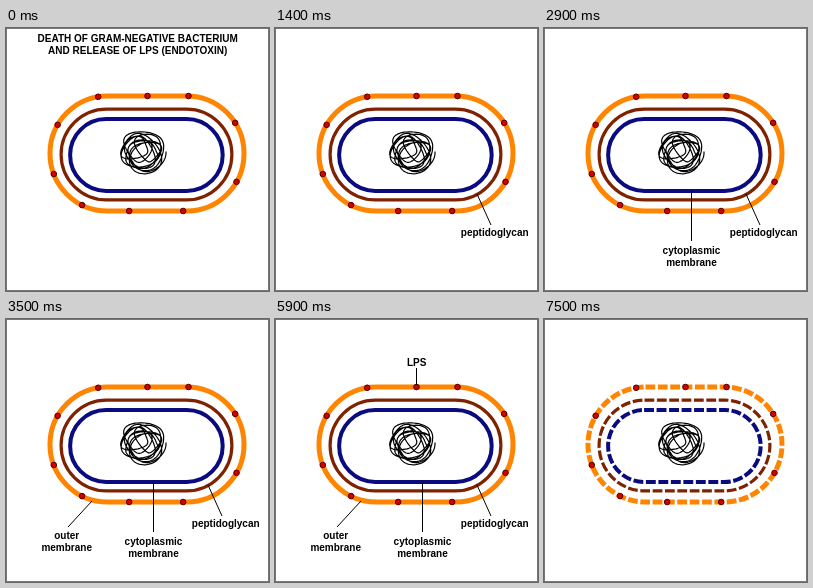
An HTML page for the animation above (8000 ms loop, 263x263 px).

```html
<!DOCTYPE html>
<html lang="en">
<head>
<meta charset="utf-8">
<title>Bacterium wall layers</title>
<style>
  html, body { margin: 0; width: 100%; height: 100%; overflow: hidden; background: #fff; }
  svg { display: block; width: 100%; height: 100%; }
  text { font: bold 10px "Liberation Sans", Arial, sans-serif; text-anchor: middle; fill: #000; }
  .frame { fill: #fff; stroke: #777; }
  .pointer { stroke: #000; stroke-width: 1; }
  .wall { fill: none; }
  .strand { fill: none; stroke: #000; stroke-width: 1.2; stroke-linejoin: round; }
  .lps { fill: #d40000; stroke: #500000; stroke-width: 1; }
</style>
</head>
<body>
<svg id="stage" viewBox="0 0 263 263"></svg>
<script>
const LOOP = 8000;
const FIRST_LABEL = 500, LABEL_GAP = 1500, LABELS_END = 6500, BREAKUP = 7500;
const LINE_HEIGHT = 12;
const DASH = 12.5, DASH_GAP = 2.6;
const stage = document.getElementById('stage');

function add(parent, tag, attrs = {}, text = '') {
  const el = document.createElementNS('http://www.w3.org/2000/svg', tag);
  for (const key in attrs) el.setAttribute(key, attrs[key]);
  if (text) el.textContent = text;
  parent.appendChild(el);
  return el;
}

// A group that is visible only from start to end (ms) in each loop.
function timed(start, end) {
  const g = add(stage, 'g');
  const steps = [[0, start === 0], [start, true], [end, false], [LOOP, end === LOOP]];
  g.animate(steps.map(([t, on]) => ({
    offset: t / LOOP, opacity: on ? 1 : 0, easing: 'steps(1, end)'
  })), { duration: LOOP, iterations: Infinity }).startTime = 0;
  return g;
}

function addText(group, lines, x, y) {
  lines.forEach((line, i) => add(group, 'text', { x, y: y + i * LINE_HEIGHT }, line));
}

// Each wall is a capsule: two half circles of radius r joined by straights of 2 * half.
const walls = [
  { x: 141, y: 125.5, half: 39.5, r: 57.5, width: 5, colour: '#ff8400' },
  { x: 140.5, y: 126.5, half: 40, r: 45.4, width: 3.2, colour: '#7f2200' },
  { x: 140.4, y: 127, half: 40.3, r: 36, width: 4, colour: '#0b0b80' }
];

function drawWall(group, { x, y, half, r, width, colour }, broken) {
  const arc = `a${r} ${r} 0 0 1 0`;
  const path = add(group, 'path', {
    class: 'wall', stroke: colour, 'stroke-width': width,
    d: `M${x - half} ${y - r}h${2 * half}${arc} ${2 * r}h${-2 * half}${arc} ${-2 * r}z`
  });
  if (broken) {
    const length = path.getTotalLength();
    const step = length / Math.round(length / DASH);
    path.setAttribute('stroke-dasharray', `${step - DASH_GAP} ${DASH_GAP}`);
  }
  return path;
}

// Tangled loops: a circle of changing size on a slowly drifting centre.
function tangle(cx, cy, turns) {
  const points = [];
  for (let a = 0; a < turns * 2 * Math.PI; a += 0.1) {
    const r = 15.5 + 4 * Math.sin(0.41 * a);
    const x = cx + r * Math.cos(a) + 6 * Math.cos(0.23 * a) + 2 * Math.cos(2.3 * a);
    const y = cy + 0.92 * r * Math.sin(a) + 5 * Math.sin(0.37 * a) + 2 * Math.sin(1.7 * a);
    points.push(`${x.toFixed(1)} ${y.toFixed(1)}`);
  }
  return 'M' + points.join('L');
}

add(stage, 'rect', { class: 'frame', x: 0.5, y: 0.5, width: 262, height: 262 });

const whole = timed(0, BREAKUP), broken = timed(BREAKUP, LOOP);
const [outer] = walls.map(wall => drawWall(whole, wall, false));
walls.forEach(wall => drawWall(broken, wall, true));

add(stage, 'path', { class: 'strand', d: tangle(136.5, 123.5, 9) });

// Distances along the outer wall, clockwise from its top left.
for (const along of [40, 81, 137, 199, 263, 317, 365, 408, 459, 510]) {
  const { x, y } = outer.getPointAtLength(along);
  add(stage, 'circle', { class: 'lps', cx: x, cy: y, r: 2.8 });
}

addText(timed(0, FIRST_LABEL),
  ['DEATH OF GRAM-NEGATIVE BACTERIUM', 'AND RELEASE OF LPS (ENDOTOXIN)'], 131.7, 14);

// Labels appear one by one, then vanish together.
const labels = [
  { lines: ['peptidoglycan'], x: 219.7, y: 207.7, from: [202, 166], to: [216, 197] },
  { lines: ['cytoplasmic', 'membrane'], x: 147.5, y: 225.5, from: [147.5, 163], to: [147.5, 213] },
  { lines: ['outer', 'membrane'], x: 60.7, y: 219.8, from: [86, 182], to: [62, 208] },
  { lines: ['LPS'], x: 141.7, y: 47, from: [141.5, 66], to: [141.5, 49] }
];
labels.forEach(({ lines, x, y, from, to }, i) => {
  const g = timed(FIRST_LABEL + i * LABEL_GAP, LABELS_END);
  addText(g, lines, x, y);
  add(g, 'line', { class: 'pointer', x1: from[0], y1: from[1], x2: to[0], y2: to[1] });
});
</script>
</body>
</html>
```
